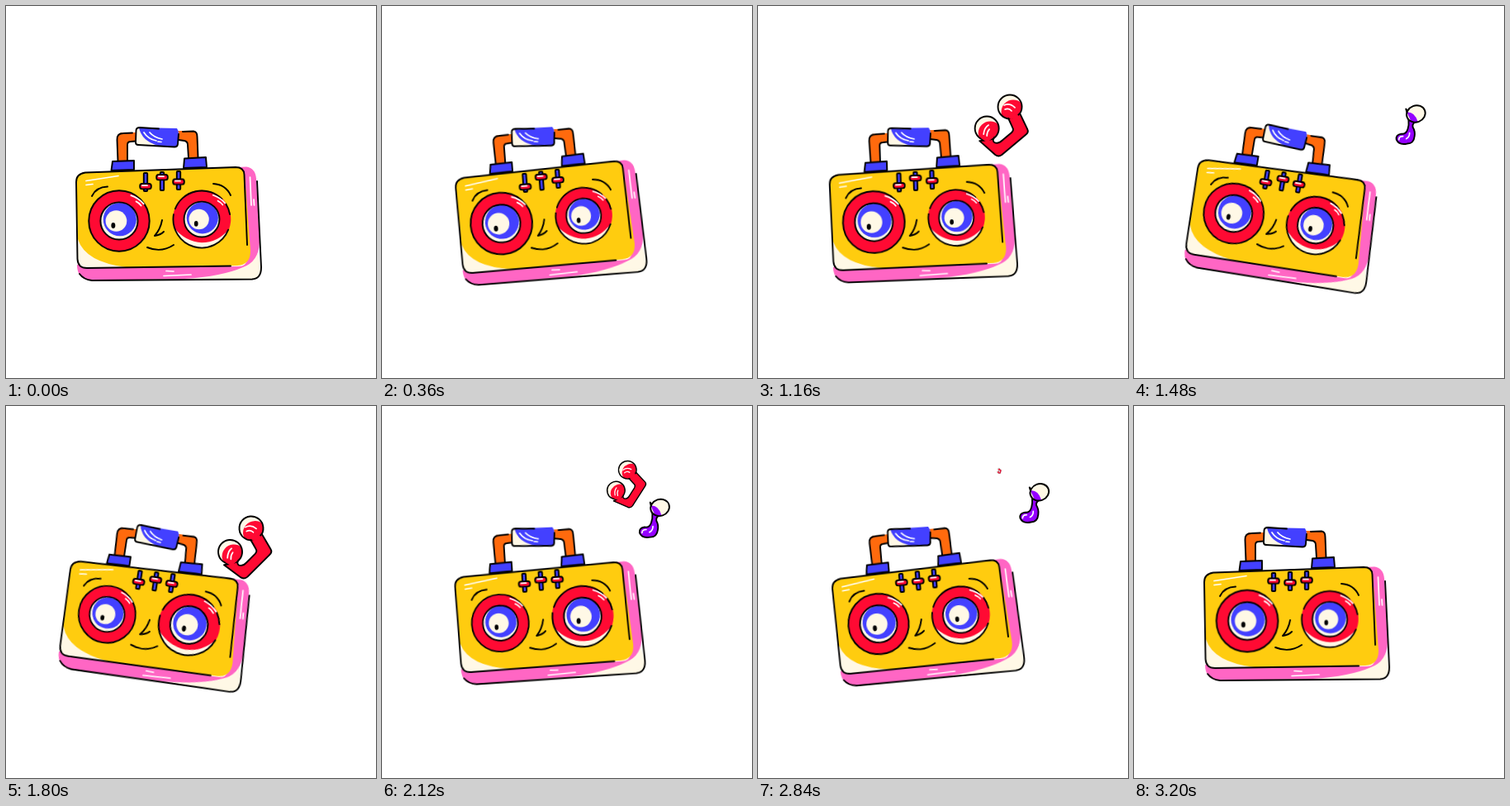
Animation, 448 px wide and 450 px high, one loop 3.24 s. Source, as an HTML page:

```html
<!DOCTYPE html>
<html lang="en">
<head>
<meta charset="utf-8">
<title>Dancing boombox</title>
<style>
  html, body { margin: 0; width: 100%; height: 100%; overflow: hidden; background: #fff; }
  svg { display: block; width: 100vw; height: 100vh; }
  :root { --loop: 3240ms; --sine: cubic-bezier(.37, 0, .63, 1); }

  .line { fill: none; stroke: #000; stroke-width: 1.9; stroke-linecap: round; stroke-linejoin: round; }
  .shine { fill: none; stroke: #fff; stroke-width: 1.7; stroke-linecap: round; }
  .ink { stroke: #000; stroke-width: 1.9; stroke-linejoin: round; }
  .cream { fill: #fff8e6; }
  .yellow { fill: #ffcc0f; }
  .pink { fill: #ff66c4; }
  .red { fill: #ff0a33; }
  .blue { fill: #4340ff; }
  .purple { fill: #9500ff; }

  .radio { transform-origin: 183px 158px; animation: swing var(--loop) var(--sine) infinite; }
  @keyframes swing {
    0%, 100% { transform: rotate(0deg); }
    25%, 75% { transform: rotate(-10.2deg); }
    50% { transform: rotate(11deg); }
  }

  .pulse { animation: pulse 202.5ms -61ms var(--sine) infinite alternate; }
  .pulse.off { animation-direction: alternate-reverse; }
  @keyframes pulse {
    from { transform: scale(1.045); }
    to { transform: scale(.955); }
  }

  .knob { animation: slide 810ms var(--sine) infinite alternate; }
  @keyframes slide {
    from { transform: translateY(var(--k)); }
    to { transform: translateY(calc(var(--k) * -1)); }
  }

  .iris { animation: glance var(--loop) var(--sine) infinite, startle var(--loop) var(--sine) infinite; }
  .pupil { animation: look var(--loop) var(--sine) infinite; }
  @keyframes glance {
    0%, 100% { translate: -3.5px 0; }
    11% { translate: -2px 0; }
    26% { translate: -1.5px 0; }
    36% { translate: 0 1px; }
    55.5% { translate: -3px 1px; }
    78% { translate: -1.5px 1px; }
  }
  @keyframes startle {
    0%, 68%, 87%, 100% { scale: 1; }
    76%, 79% { scale: .46; }
  }
  @keyframes look {
    0%, 100% { translate: -7px 5.5px; }
    11% { translate: -5px 5px; }
    26% { translate: -2px 0; }
    36% { translate: .5px -5.5px; }
    55.5% { translate: -1px 7.5px; }
    78% { translate: -1.5px 1px; }
  }

  .note {
    animation: drift var(--loop) var(--t) linear infinite both,
               pop var(--loop) var(--t) linear infinite both;
  }
  @keyframes drift {
    0% { translate: var(--a); rotate: var(--r); }
    17.3%, 100% { translate: var(--b); rotate: calc(var(--r) - 22deg); }
  }
  @keyframes pop {
    0% { scale: 0; }
    3%, 14% { scale: 1; }
    17.3%, 100% { scale: 0; }
  }
</style>
</head>
<body>
<svg viewBox="0 0 448 450">
  <defs>
    <g id="cone">
      <circle class="cream" r="22"/>
      <circle class="blue" cx=".8" cy="-1.8" r="19.6"/>
      <circle class="line" r="22"/>
      <circle class="cream iris" r="12.5"/>
      <ellipse class="pupil" rx="2.4" ry="3.4"/>
      <path class="shine" d="M14-30q9 3 15 10M20-23q4 2 6 5"/>
    </g>

    <g id="slider">
      <rect class="blue ink" x="-2.2" y="-11" width="4.4" height="22" rx="1" stroke-width="1.3"/>
      <g class="knob">
        <rect class="red ink" x="-6.8" y="-3" width="13.6" height="6.4" rx="2.6"/>
        <path class="shine" d="M-4-.8h6" stroke-width="1"/>
      </g>
    </g>

    <clipPath id="head"><circle r="14.5"/></clipPath>
    <g id="bulb">
      <circle class="cream" r="14.5"/>
      <circle class="red" cx="4" cy="6" r="14.5" clip-path="url(#head)"/>
      <circle class="line" r="14.5"/>
    </g>

    <g id="pair">
      <use href="#bulb" x="10" y="-23"/>
      <use href="#bulb" x="-18" y="3"/>
      <path class="red ink" d="M22-15L31 4Q33 8 29 11L0 35Q-4 38-8 35L-27 18Q-20 18-12 16L-9 14Q-12 18-9 20Q-4 22 0 18L12 8Q15 5 13 2L8-9Q17-9 22-15Z"/>
      <path class="red" d="M16-19l6 10-11 1-7-6zM-14 4l4 10-8 6-7-5z"/>
      <path class="shine" d="M3-25q7-3 13 3M4-20q5-2 8 2M-22 10q1-8 6-11M-18 12q0-5 3-8"/>
    </g>

    <g id="single">
      <path class="purple ink" d="M-5-19Q0-4-3 5Q-5 12-11 11Q-18 12-17 18Q-14 25-4 23Q4 23 5 14Q6 8 3 3Q2-2 8-4Z"/>
      <ellipse class="cream" cx="7" cy="-13" rx="11.5" ry="10" transform="rotate(-20 7 -13)"/>
      <path class="purple" d="M-4-15Q5-16 9-4Q5-1 1-4Z"/>
      <ellipse class="line" cx="7" cy="-13" rx="11.5" ry="10" transform="rotate(-20 7 -13)"/>
      <path class="shine" d="M-9 14q-5 0-5 4M-1 10q0 5-4 7"/>
    </g>
  </defs>

  <!-- music notes -->
  <g class="note" style="--t:590ms;--a:306px 159px;--b:369px 129px;--r:10deg"><use href="#single"/></g>
  <g class="note" style="--t:900ms;--a:290px 165px;--b:301px 122px;--r:10deg"><use href="#pair"/></g>
  <g class="note" style="--t:1210ms;--a:306px 159px;--b:365px 127px;--r:10deg"><use href="#single"/></g>
  <g class="note" style="--t:1640ms;--a:286px 210px;--b:297px 77px;--r:1deg"><use href="#pair"/></g>
  <g class="note" style="--t:1900ms;--a:306px 159px;--b:365px 100px;--r:10deg"><use href="#single"/></g>
  <g class="note" style="--t:2290ms;--a:289px 179px;--b:292px 77px;--r:-12deg"><use href="#pair"/></g>
  <g class="note" style="--t:2560ms;--a:306px 160px;--b:362px 75px;--r:10deg"><use href="#single"/></g>

  <g class="radio">
    <!-- handle -->
    <g fill="#ff6a0d">
      <path d="M135 190V160Q135 153 142 153L158 153V164L150 164Q147 164 147 168V190Z"/>
      <path d="M207 151L226 151Q232 152 232 158L233 186H221L220 167Q220 163 216 163H207Z"/>
    </g>
    <path class="line" d="M135.500 188L134.500 162Q134 154 142 154L153 153.500M147 187V168Q147 164 151 164L157 163.500M214 152L227 151.500Q231.500 152 231.500 158L232.500 183M209 162L216 163Q220 164 220 168L221 184"/>
    <path class="blue ink" d="M129 188L155 187V198L127.500 199Z"/>
    <path class="blue ink" d="M216 184.500L242 183L243 195L215 196Z"/>
    <path class="cream" d="M160 147L206 151Q209 151 209 154L208 168Q207 171 204 170.500L160 168Q157 168 157 165V150Q157 147 160 147Z"/>
    <path class="blue" d="M161 147L207 148Q209 151 209 154L208 168Q207 171 204 170.500L184 169Q164 163 161 147Z"/>
    <path class="line" d="M185 148.500L162 147Q157.500 147 157.500 151L157 165Q157 168 160 168L204 170.500Q207.500 170.500 208 167L209 155"/>
    <path class="shine" d="M167 153q5 8 15 10M174 153q5 6 15 8M184 164l4 .5"/>

    <!-- case behind -->
    <path class="cream" d="M90 300H305L309 318Q309 330 298 330L102 332Q88 331 86 315Z"/>
    <path class="pink" d="M280 195L291 194.500Q302 196 303 209L307 286Q306 309 287 316Q262 327 216 330L102 332Q86 330 86 313L200 305L280 300Z"/>
    <path class="line" d="M304 212L309 316Q309 330 298 330.500L104 332Q94 331 89 324"/>
    <path class="shine" d="M295.500 207l1.500 34M300 234l.5 7M194 320.500l9 .5M191 326.500l33-1.500"/>

    <!-- front panel -->
    <path class="cream" d="M96 202L280 195Q288 195 288 204L292 306Q291 315 282 315L98 317Q87 317 87 306L85 213Q85 203 96 202Z"/>
    <path class="yellow" d="M96 202L280 195Q288 195 289 204L296 296Q296 313 280 314L146 316Q96 310 87 282L85 213Q85 203 96 202Z"/>
    <path class="line" d="M272 314.500L98 317Q87 317 86.500 306L85 213Q85 203 96 201.500L278 195Q288 195 288.500 204L292 289"/>
    <path class="shine" d="M97 211.500l39-6M97 216.500l8-1"/>

    <!-- sliders -->
    <g transform="translate(169 213)" style="--k:5px"><use href="#slider"/></g>
    <g transform="translate(189 212)" style="--k:-5px"><use href="#slider"/></g>
    <g transform="translate(209 211)" style="--k:1.5px"><use href="#slider"/></g>

    <!-- face -->
    <path class="line" d="M104 230Q109 219 123 218.500M251 215Q266 216 272 229M189 259Q187 270 180 278Q187 277 191 273M171 292Q188 299 203 289"/>

    <!-- speakers -->
    <g transform="translate(137 260)">
      <g class="pulse">
        <circle class="red ink" r="35.800"/>
        <use href="#cone"/>
      </g>
    </g>
    <g transform="translate(237 258)">
      <g class="pulse off">
        <circle class="cream" r="35.500"/>
        <path class="red" d="M-34 11A36 36 0 1 1 34 12Q20 29 0 29Q-20 28-34 11Z"/>
        <path class="line" d="M25-25.200A35.500 35.500 0 0 0-33-13M-35-6A35.500 35.500 0 0 0 33 13M35-6A35.500 35.500 0 0 0 30-19"/>
        <use href="#cone"/>
      </g>
    </g>
  </g>
</svg>
</body>
</html>
```
